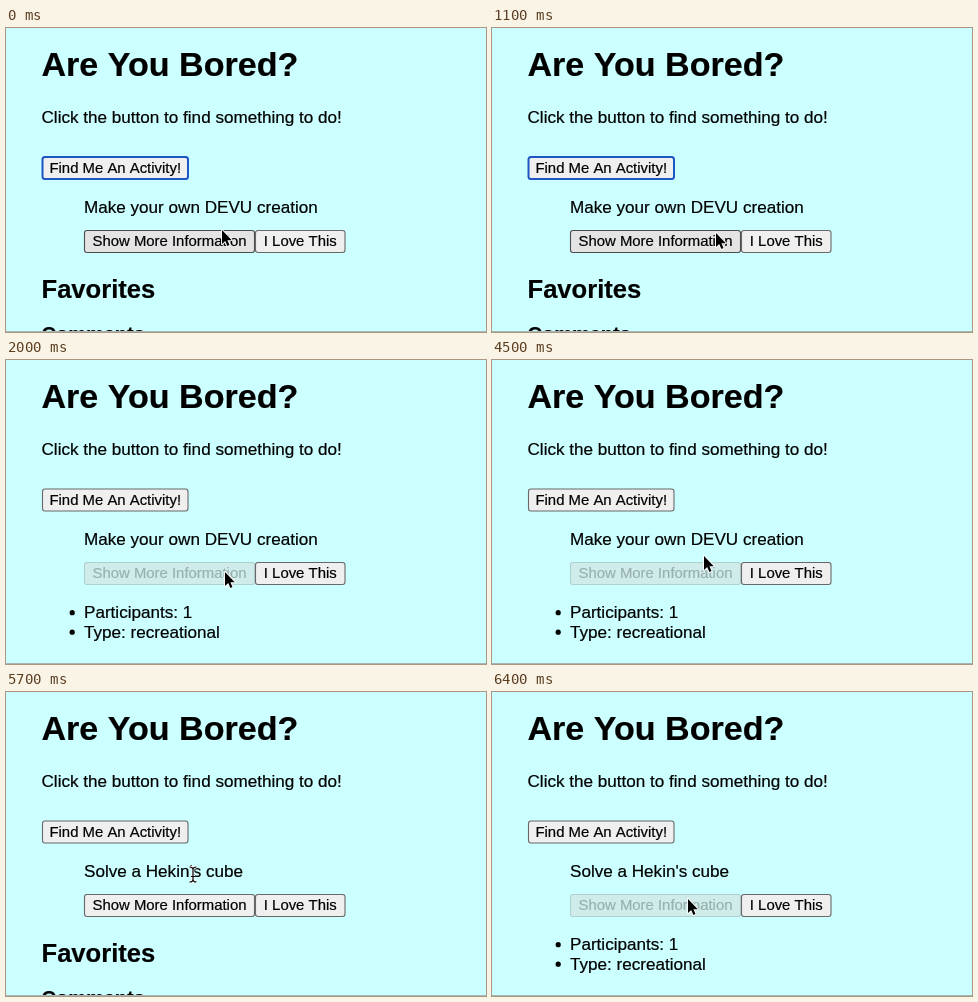
Animation of 480 by 304 pixels, one loop 8000 ms. Source, as an HTML page with a canvas:

```html
<!DOCTYPE html>
<html lang="en">
<head>
<meta charset="utf-8">
<title>Are You Bored?</title>
<style>
  html, body { margin: 0; width: 100%; height: 100%; overflow: hidden; background: #cff; }
  canvas { display: block; }
</style>
</head>
<body>
<canvas id="stage" width="480" height="304"></canvas>
<script>
const ctx = document.getElementById('stage').getContext('2d');
const LOOP = 8000, STEP = 100;
const SANS = '"Liberation Sans", Arial, sans-serif';
const INK = '#000';
const BODY = 17.1, LEFT = 35.5, INDENT = 78, BUTTON_H = 23;

const CLICK_MORE = 1700, CLICK_FIND = 5200, NEW_IDEA = 5400, CLICK_MORE_AGAIN = 6300;

// Each move eases the pointer from where it is to a new place.
const home = { x: 216, y: 202 };
const moves = [
  { from: 0, to: 600, x: 285, y: 210 },
  { from: 700, to: 1100, x: 224, y: 205 },
  { from: 1100, to: 1500, x: 219, y: 212 },
  { from: 4400, to: 4500, x: 212, y: 196 },
  { from: 4600, to: 5300, x: 171, y: 139 },
  { from: 5500, to: 6000, x: 196, y: 207 }
];

const buttons = {
  find: { x: 36, y: 128.5, w: 146.5, label: 'Find Me An Activity!' },
  more: { x: 78, y: 202, w: 171, label: 'Show More Information' },
  love: { x: 249, y: 202, w: 90.5, label: 'I Love This' }
};

const easeOut = p => 1 - (1 - p) ** 2;
const clamp01 = p => Math.min(1, Math.max(0, p));

function pointerAt(t) {
  return moves.reduce((p, m) => {
    const k = easeOut(clamp01((t - m.from) / (m.to - m.from)));
    return { x: p.x + (m.x - p.x) * k, y: p.y + (m.y - p.y) * k };
  }, home);
}

// A hairline stroke gives the glyphs a slightly fuller weight.
function text(str, x, y, size, { weight = 'normal', align = 'left', color = INK } = {}) {
  ctx.font = `${weight} ${size}px ${SANS}`;
  ctx.textAlign = align;
  ctx.fillStyle = ctx.strokeStyle = color;
  ctx.lineWidth = 0.2;
  ctx.fillText(str, x, y);
  ctx.strokeText(str, x, y);
}

function isOver(b, p) {
  return p.x >= b.x && p.x < b.x + b.w && p.y >= b.y && p.y < b.y + BUTTON_H;
}

function buttonColors(disabled, focused, hover) {
  if (disabled) return { fill: '#d0ecea', edge: '#b0d0ce', label: '#98b0ae' };
  const fill = hover ? '#e4e4e4' : '#efefef';
  const edge = focused ? '#1d55c4' : hover ? '#4c4c4c' : '#686868';
  return { fill, edge, label: INK };
}

function drawButton(b, pointer, { disabled = false, focused = false } = {}) {
  const colors = buttonColors(disabled, focused, isOver(b, pointer));
  ctx.beginPath();
  ctx.roundRect(b.x + 0.5, b.y + 0.5, b.w - 1, BUTTON_H - 1, 2.5);
  ctx.fillStyle = colors.fill;
  ctx.fill();
  ctx.lineWidth = focused ? 2 : 1.1;
  ctx.strokeStyle = colors.edge;
  ctx.stroke();
  text(b.label, b.x + b.w / 2, b.y + 16.2, 14.9, { align: 'center', color: colors.label });
}

function drawItem(str, y) {
  ctx.beginPath();
  ctx.arc(66.2, y - 5.3, 2.6, 0, Math.PI * 2);
  ctx.fillStyle = INK;
  ctx.fill();
  text(str, INDENT, y, BODY);
}

const arrow = new Path2D('M0 0V14L3.2 11L5.4 16L7.5 15.1L5.4 10.2H9.8Z');
const beam = new Path2D('M-3.5 -7.5Q0 -7.5 0 -5V5Q0 7.5 -3.5 7.5M3.5 -7.5Q0 -7.5 0 -5V5Q0 7.5 3.5 7.5M-2 2H2');

function strokeShape(shape, width, color) {
  ctx.lineJoin = 'round';
  ctx.lineWidth = width;
  ctx.strokeStyle = color;
  ctx.stroke(shape);
}

function drawPointer(p, textEnd) {
  const onText = p.y > 169 && p.y < 191 && p.x >= INDENT && p.x < textEnd;
  ctx.save();
  ctx.translate(p.x, p.y);
  if (onText) {
    strokeShape(beam, 2.8, '#fff');
    strokeShape(beam, 1.2, INK);
  } else {
    strokeShape(arrow, 1.8, '#fff');
    ctx.fillStyle = INK;
    ctx.fill(arrow);
  }
  ctx.restore();
}

function draw(t) {
  const pointer = pointerAt(t);
  const fresh = t >= NEW_IDEA;
  const shownAgain = t >= CLICK_MORE_AGAIN;
  const showInfo = (t >= CLICK_MORE && t < CLICK_FIND) || shownAgain;
  const disabled = (t >= CLICK_MORE && !fresh) || shownAgain;
  const bold = { weight: 'bold' };

  ctx.fillStyle = '#cff';
  ctx.fillRect(0, 0, 480, 304);

  text('Are You Bored?', LEFT, 48, 34.1, bold);
  text('Click the button to find something to do!', LEFT, 95, BODY);
  drawButton(buttons.find, pointer, { focused: t < CLICK_MORE });
  text(fresh ? "Solve a Hekin's cube" : 'Make your own DEVU creation', INDENT, 185, BODY);
  drawButton(buttons.more, pointer, { disabled });
  drawButton(buttons.love, pointer);

  if (showInfo) {
    drawItem('Participants: 1', 258);
    drawItem('Type: recreational', 277.5);
  } else {
    text('Favorites', LEFT, 270, 25.6, bold);
    text('Comments', LEFT, 313, 20, bold);
  }

  ctx.fillStyle = '#a6b4b4';
  ctx.fillRect(0, 303, 480, 1);
  drawPointer(pointer, fresh ? 238 : 312);
}

const start = performance.now();
function frame() {
  const t = (performance.now() - start) % LOOP;
  draw(Math.floor(t / STEP) * STEP);
  requestAnimationFrame(frame);
}
frame();
</script>
</body>
</html>
```
